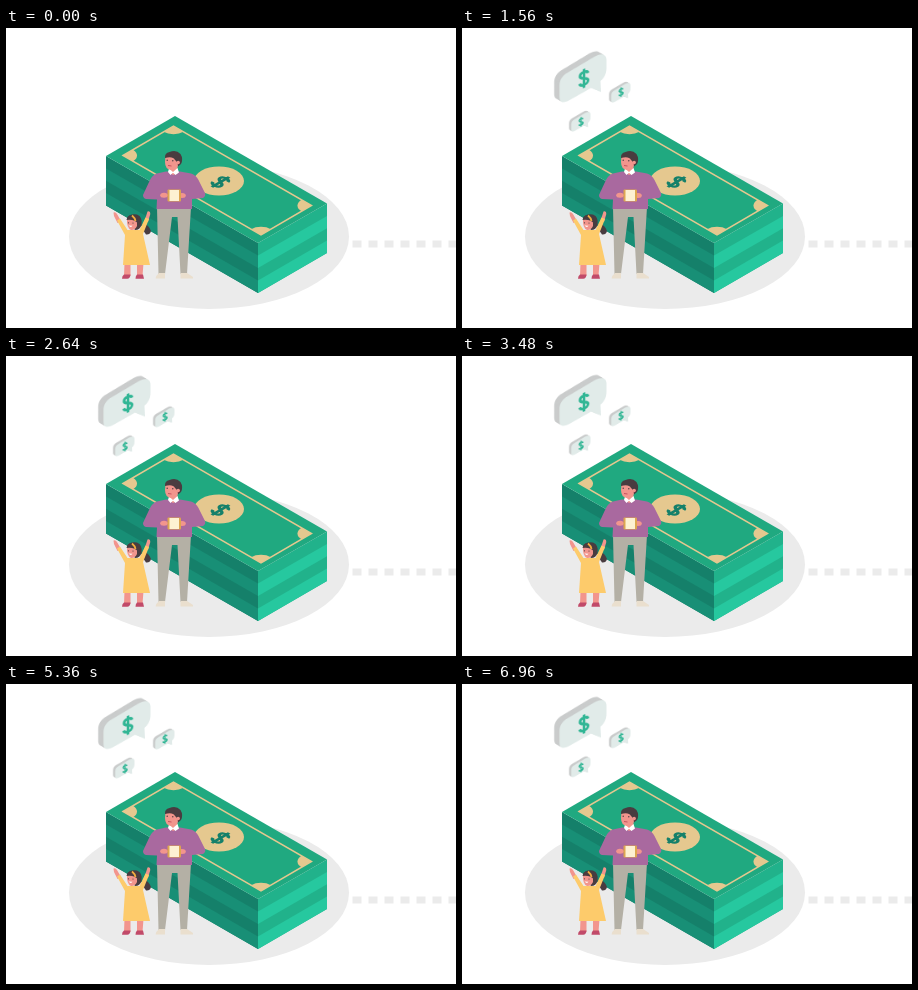
Animation, 450 px wide and 300 px high, one loop 7 s. Source, as an HTML page:

```html
<!DOCTYPE html>
<html lang="en">
<head>
<meta charset="utf-8">
<title>Savings</title>
<style>
  html, body { margin: 0; width: 100%; height: 100%; overflow: hidden; background: #fff; }
  svg { display: block; width: 450px; height: 300px; }
  .tan { fill: #e5c88f; }
  .skin { fill: #f2958d; }
  .hair { fill: #493c40; }
  .sweater { fill: #a9699f; }
  .dress { fill: #fdcb6b; }
  .float { animation: float 7s infinite cubic-bezier(.37, 0, .63, 1); }
  .pop { animation: pop 7s infinite ease-out; }

  @keyframes float {
    0%, .21%, 29.357%, 58.5% { transform: translateY(11.1px); }
    14.786%, 43.929%, 73.071% { transform: translateY(-12.5px); }
    /* the loop cuts off just before the last crest */
    87.643% { transform: translateY(11.1px); animation-timing-function: cubic-bezier(.374, 0, .653, .775); }
    100% { transform: translateY(-11.2px); }
  }
  @keyframes pop {
    0%, 1.6% { transform: scale(0); }
    4.143% { transform: scale(1.2); animation-timing-function: ease-in-out; }
    6.857%, 100% { transform: scale(1); }
  }
</style>
</head>
<body>
<svg viewBox="0 0 450 300">
  <defs>
    <path id="dollar" fill="none" d="M4.2-4.2C3.8-7.4-4.2-7.8-4.2-3.7C-4.2.6 4.3-.8 4.3 3.7C4.3 7.8-4 7.6-4.5 4.1M0-10V10"/>
    <path id="face" d="M-21 9C-21 3-18.5-1-12.5-4.5L13.5-20C20.5-24.2 26-23 26-17V-9C26-3 23.5 1 20 4L20.5 15L10.5 11L-10.5 23C-17.5 27-21 25.5-21 20Z"/>
    <g id="bubble">
      <g fill="#cacccc">
        <use href="#face" x="-5.3" y="-3"/>
        <use href="#face" x="-3.5" y="-2"/>
        <use href="#face" x="-1.7" y="-1"/>
      </g>
      <use href="#face" fill="#e1ebe9"/>
    </g>
    <path id="inner" d="M117 127.5L167.5 98L305.5 177.5L255 207Z"/>
    <clipPath id="inside"><use href="#inner"/></clipPath>
  </defs>

  <ellipse cx="203" cy="208.5" rx="140" ry="72.5" fill="#ebebeb"/>
  <path d="M346.5 216H450" stroke="#ebebeb" stroke-width="7" stroke-dasharray="9 7"/>

  <!-- stack of notes -->
  <path fill="#15806a" d="M100 128L252 215V265L100 177.5Z"/>
  <path fill="#188f76" d="M100 140.4L252 227.5V240L100 152.8ZM100 165.1L252 252.5V265L100 177.5Z"/>
  <path fill="#21b28b" d="M252 215L321 175.5V225L252 265Z"/>
  <path fill="#26c89f" d="M252 227.5L321 187.9V200.3L252 240ZM252 252.5L321 212.6V225L252 265Z"/>
  <path fill="#20a980" d="M100 128L169 88L321 175.5L252 215Z"/>
  <g class="tan" clip-path="url(#inside)">
    <ellipse cx="117" cy="127.5" rx="14" ry="8.2"/>
    <ellipse cx="167.5" cy="98" rx="14" ry="8.2"/>
    <ellipse cx="305.5" cy="177.5" rx="14" ry="8.2"/>
    <ellipse cx="255" cy="207" rx="14" ry="8.2"/>
  </g>
  <use href="#inner" fill="none" stroke="#e5c88f" stroke-width="1.5"/>
  <ellipse class="tan" cx="213" cy="153" rx="25" ry="14.5"/>
  <use href="#dollar" transform="matrix(.866 .5 -.866 .5 214.5 154)" stroke="#15806a" stroke-width="2.9"/>

  <!-- father -->
  <path fill="#b4b0a5" d="M151 179H185L181 246H174.5L171.5 189H166L159 246H152.5Z"/>
  <path fill="#eadfce" d="M153 245H159V250.5H149.5Q150 247.5 153 245ZM174.5 245H181L187 249V250.5H174.5Z"/>
  <path class="sweater" d="M160 143.5L151 145.5Q146 147 143.5 153L137 167Q137 170 140 171L151 171.5L150.5 181H186V171L197 170Q200 168 199 165L192.5 152Q190 147 185 145.5L174 143.5Z"/>
  <path class="skin" d="M163 138H171.5V145L167 147L163 144Z"/>
  <path fill="#fff" d="M163 140.5L167 144L171.5 140L173 144.5L169.5 147L167 144.8L164.5 147L162 144Z"/>
  <path class="skin" d="M159.5 128Q166 124 173 129V135Q171 142 165 142Q159 141 159 134Z"/>
  <path class="hair" d="M159 130Q158.5 125 163.5 124Q170 121 174.5 126Q177.5 131 175 136L172 138.5Q172 134 169 132Q167 128 159 130Z"/>
  <circle class="skin" cx="172.2" cy="134.5" r="1.7"/>
  <g class="hair"><circle cx="161.2" cy="132.3" r=".7"/><circle cx="166.8" cy="132.8" r=".7"/></g>
  <path d="M162 137.5L165.5 138" stroke="#c9525e" stroke-width="1"/>
  <g class="skin"><ellipse cx="158" cy="167.3" rx="3.8" ry="2.5"/><ellipse cx="176" cy="167.5" rx="3.8" ry="2.5"/></g>
  <rect x="161.5" y="161.5" width="13.5" height="12" rx="1" fill="#dda650"/>
  <rect x="163.5" y="162" width="9.5" height="11" fill="#fdf1d2"/>

  <!-- daughter -->
  <path class="hair" d="M137 195Q143 197 145 203Q144 207 140 206.5Q137 203 136 198Z"/>
  <g class="skin">
    <path d="M118.5 235H124.5V248H118ZM131 235H137.5L136.5 248H131Z"/>
    <path d="M107.5 184.5Q109.5 183.5 111 186L115 193L111.5 195L108 188ZM141.5 183.5Q144.5 182.5 144.3 186L142 194L138.5 193Z"/>
  </g>
  <path fill="#c14a69" d="M118 246.5H124.5Q124 251 121 250.8H116Q116 248 118 246.5ZM131 246.5H137L138 250.8H129.5Q129.5 248 131 246.5Z"/>
  <path class="dress" d="M111 192.5L114 190.5L121.5 202H133.5L139.5 189.5L143 191L137 206L144 237H117L119 207Z"/>
  <path class="hair" d="M121 190Q124 185 131 186.5Q137 189 135.5 197Q134 202 129 202Z"/>
  <path class="skin" d="M121 191Q126 188.5 131 193V198Q129 202.5 125 202Q120.5 200 121 191Z"/>
  <path class="hair" d="M120.5 192Q121.5 186.5 127 187Q132.5 188.5 132 196Q129 191 120.5 192Z"/>
  <path d="M126 187.5Q129 190 129.5 193" fill="none" stroke="#f3ad3f" stroke-width="1.8"/>
  <g class="hair"><circle cx="122.5" cy="194.8" r=".6"/><circle cx="127" cy="195" r=".6"/></g>
  <path fill="#fff" d="M122.5 197.5L126.5 197.8Q125 200.2 122.5 197.5Z"/>

  <!-- speech bubbles -->
  <g class="float" stroke="none">
    <g transform="translate(118.5 49)"><g class="pop">
      <use href="#bubble"/>
      <use href="#dollar" transform="matrix(.95 -.35 0 .95 3.5 1.5)" stroke="#31b695" stroke-width="2.8"/>
    </g></g>
    <g transform="translate(157.8 64.2)"><g class="pop">
      <use href="#bubble" transform="scale(.41)"/>
      <use href="#dollar" transform="matrix(.47 -.17 0 .47 1.2 0)" stroke="#31b695" stroke-width="2.8"/>
    </g></g>
    <g transform="translate(117.8 93.2)"><g class="pop">
      <use href="#bubble" transform="scale(.41)"/>
      <use href="#dollar" transform="matrix(.47 -.17 0 .47 1.2 .7)" stroke="#31b695" stroke-width="2.8"/>
    </g></g>
  </g>
</svg>
</body>
</html>
```
